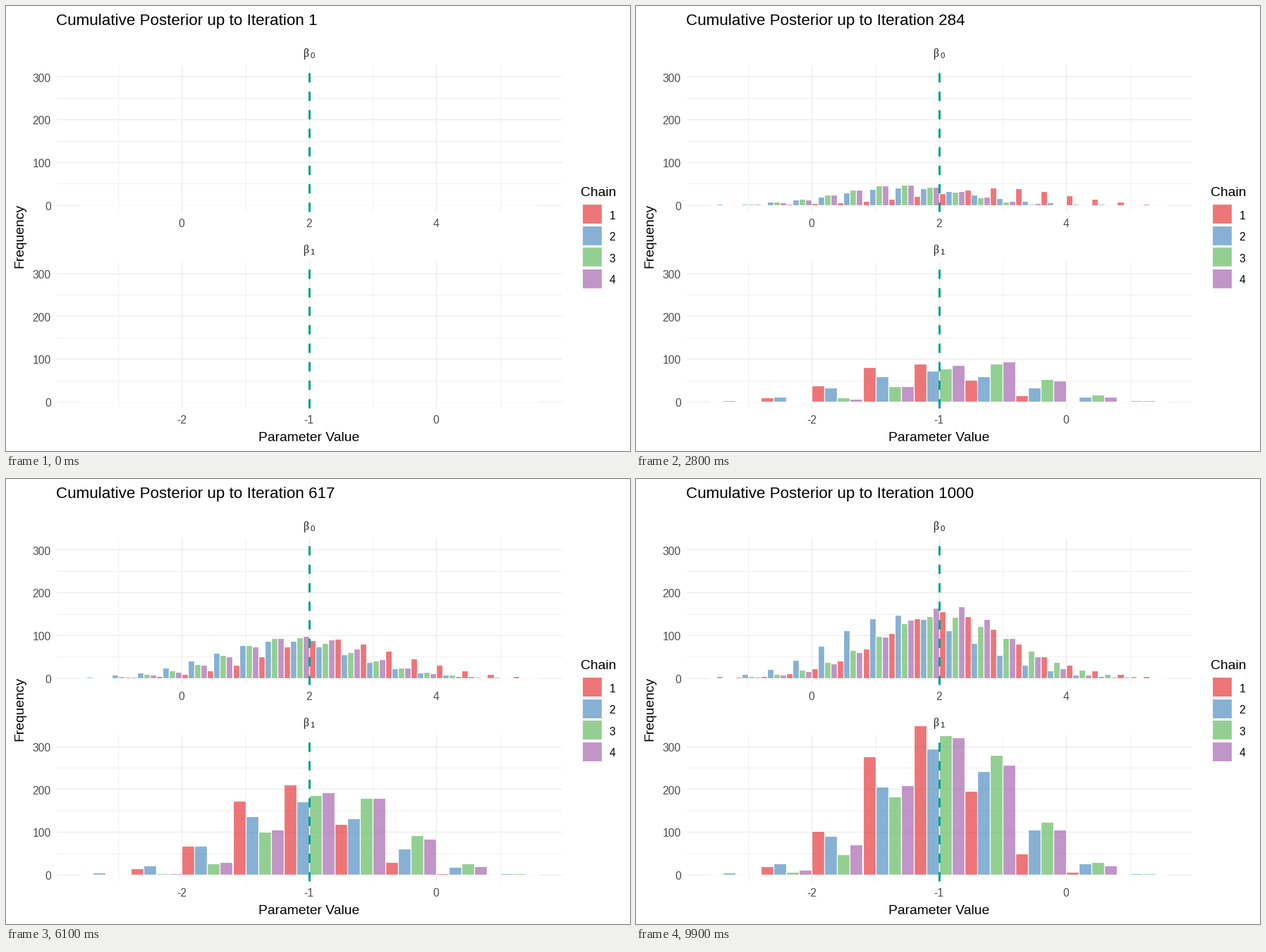
These frames come from a looping animation (885x632 px, 10 s). A matplotlib script:

```python
import numpy as np
import matplotlib.pyplot as plt
from matplotlib.animation import FuncAnimation
from matplotlib.colors import to_rgba
from matplotlib.patches import Rectangle

W, H = 885, 632
FRAMES, INTERVAL = 100, 100
LEFT, RIGHT = 72.5, 788.5
BARS_LEFT, BARS_WIDTH = 105.4, 649.8
BIN = 0.4        # bin width in parameter units
SCALE = 0.608    # pixels per count
COLORS = [to_rgba(c, 0.6) for c in ("#E41A1C", "#377EB8", "#4DAF4A", "#984EA3")]
GREY, DARK = "#4D4D4D", "#1A1A1A"

# Each chain wanders: (mean, spread) of its draws in each phase of the run.
PHASES = np.array([0, 173, 415, 849, 1000])
BETA0 = [
    [(3.32, 0.92), (2.27, 1.25), (2.24, 0.74), (1.34, 0.88)],
    [(1.40, 0.98), (1.71, 1.40), (1.64, 0.98), (0.83, 0.74)],
    [(0.98, 0.96), (1.66, 0.78), (2.39, 1.04), (2.50, 0.94)],
    [(1.02, 0.88), (1.80, 0.84), (2.24, 0.88), (2.26, 0.70)],
]
BETA1 = [
    [(-1.15, 0.50), (-1.12, 0.48), (-1.05, 0.40), (-1.12, 0.50)],
    [(-0.94, 0.61), (-1.10, 0.62), (-1.00, 0.50), (-0.75, 0.39)],
    [(-0.69, 0.49), (-0.76, 0.51), (-0.97, 0.45), (-0.94, 0.41)],
    [(-0.73, 0.45), (-0.77, 0.47), (-1.04, 0.47), (-1.14, 0.46)],
]

plt.rcParams["font.family"] = "Liberation Sans"
fig = plt.figure(figsize=(W / 72, H / 72), dpi=72, facecolor="white")
ax = fig.add_axes([0, 0, 1, 1])
# half a pixel of offset lets snapped lines fall on the pixel they lie in
ax.set(xlim=(0.5, W + 0.5), ylim=(H + 0.5, 0.5))
ax.axis("off")


def label(x, y, s, size, color="black", ha="left", **kw):
    return ax.text(x + 0.5, y + 0.5, s, fontsize=size, color=color, ha=ha,
                   va="baseline", **kw)


def line(x, y, width, color="#EBEBEB", z=1, **kw):
    ax.plot(x, y, color=color, lw=width, zorder=z, solid_capstyle="butt",
            dash_capstyle="butt", **kw)


def box(x, y, w, h, color):
    return ax.add_patch(Rectangle((x, y), w, h, fc=color, ec="white",
                                  lw=1.2, zorder=3))


def draw_panel(zero, subscript, ticks):
    top, bottom = zero - 199.2, zero + 9.2
    for k in range(7):
        x = BARS_LEFT + BARS_WIDTH * (k + 0.6) / 7.2
        line([x, x], [top, bottom], 1.3 if k % 2 else 0.7)
    for count in range(0, 301, 50):
        y = zero - SCALE * count
        major = count % 100 == 0
        line([LEFT, RIGHT], [y, y], 1.3 if major else 0.7)
        if major:
            label(63.8, y + 6.8, str(count), 15.6, GREY, "right")
    for k, tick in enumerate(ticks):
        label(248.8 + 180.6 * k, zero + 30.3, tick, 15.6, GREY, "center")
    # outlines of the empty bars hide the zero line
    line([BARS_LEFT, BARS_LEFT + BARS_WIDTH], [zero, zero], 1.5, "white", 2)
    mid = BARS_LEFT + BARS_WIDTH / 2
    line([mid, mid], [bottom, top], 3, "#00A087", 4, dashes=(4.38, 4.38))
    label(422.4, zero - 211.3, "β", 16, DARK, family="Liberation Serif")
    label(431, zero - 209.3, subscript, 11.2, DARK)


def make_bars(zero, start, bins, chains):
    """Dodged bars of one panel, each with its share of draws per phase."""
    centers = start + BIN * (np.arange(bins) + 0.5)
    width = BARS_WIDTH / bins / len(chains)
    bars = []
    for c, phases in enumerate(chains):
        mean, sd = np.array(phases).T[:, :, None]
        z = (centers - mean) / sd
        share = BIN * np.exp(-z**2 / 2) / (sd * np.sqrt(2 * np.pi))
        for b in range(bins):
            x = BARS_LEFT + width * (len(chains) * b + c)
            bars.append((box(x, zero, width, 0, COLORS[c]), share[:, b]))
    return bars


draw_panel(283.2, "0", ["0", "2", "4"])
draw_panel(562.45, "1", ["-2", "-1", "0"])
bars = make_bars(283.2, -1.6, 18, BETA0) + make_bars(562.45, -2.8, 9, BETA1)

title = label(71.3, 27, "", 22.4)
label(430, 618, "Parameter Value", 19.2, ha="center")
label(24, 326.5, "Frequency", 19.2, ha="center", rotation=90,
      rotation_mode="anchor")
label(815, 270, "Chain", 19.2)
for k, color in enumerate(COLORS):
    y = 281.8 + 30.5 * k
    box(817.2, y, 28, 28, color)
    label(855.5, y + 21, str(k + 1), 15.6)


def update(i):
    n = round(1 + 999 * i / (FRAMES - 1))
    title.set_text(f"Cumulative Posterior up to Iteration {n}")
    draws = np.clip(n - PHASES[:-1], 0, np.diff(PHASES))
    for bar, share in bars:
        count = round(draws @ share)
        bar.set_height(-SCALE * count)
        bar.set_visible(count > 0)
    return [title] + [bar for bar, _ in bars]


anim = FuncAnimation(fig, update, frames=FRAMES, interval=INTERVAL,
                     repeat=True, repeat_delay=0, blit=False)
plt.show()
```
